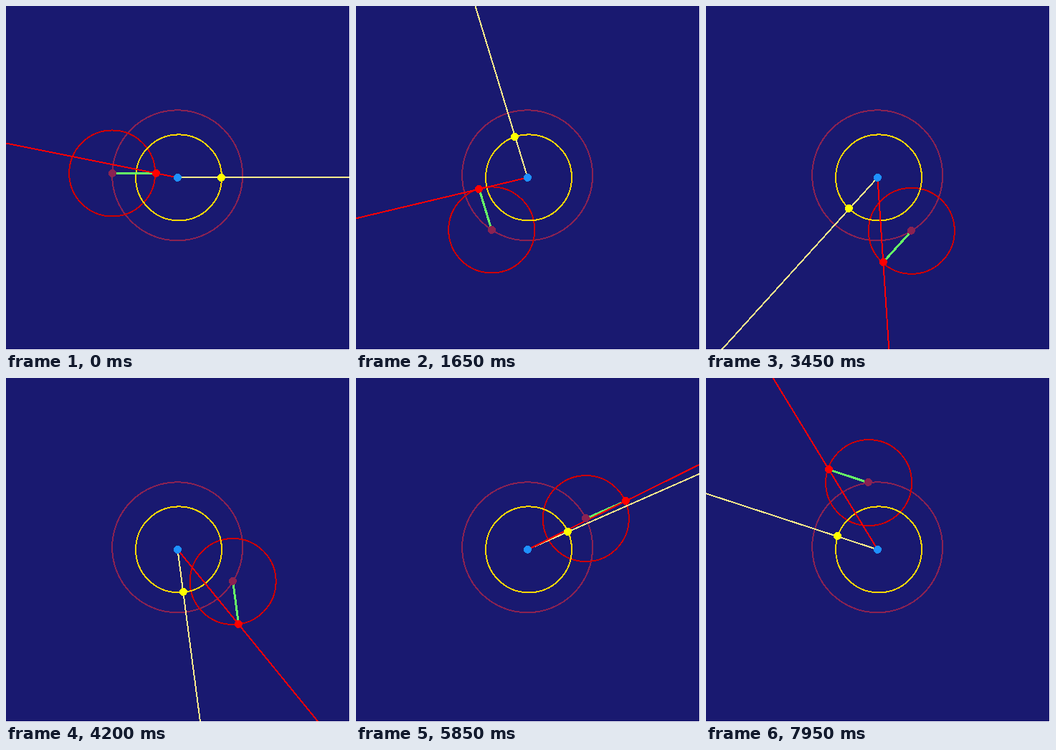
An HTML page that plays this animation: 480x480 px, repeating every 8000 ms.

```html
<!DOCTYPE html>
<html lang="en">
<head>
<meta charset="utf-8">
<title>Epicycle model</title>
<style>
  html, body { margin: 0; width: 100%; height: 100%; overflow: hidden; background: #fff; }
  svg { display: block; background: #191970; shape-rendering: crispEdges; fill: none; stroke-width: 2; }
</style>
</head>
<body>
<svg width="479" height="479" viewBox="0 0 479 479">
  <g transform="translate(-.35 -.2)">
    <circle id="deferent" stroke="#8b2252"/>
    <circle id="epicycle" stroke="#cd0000"/>
    <circle id="sunOrbit" stroke="#ffd700"/>
    <line id="arm" stroke="#66ff66" stroke-width="3"/>
    <line id="sunRay" stroke="#ffec8b"/>
    <line id="planetRay" stroke="#ff0000"/>
  </g>
  <circle id="hubDot" r="5.4" fill="#8b2252"/>
  <circle id="planetDot" r="5.4" fill="#ff0000"/>
  <circle id="sunDot" r="5.4" fill="#ffff00"/>
  <circle id="earthDot" r="5.4" fill="#1e90ff"/>
</svg>
<script>
const LOOP = 8000, STEP = 150;
const RAD = Math.PI / 180;

const earth = { x: 239.8, y: 239.6 };
const sunOrbit = { x: 241.4, y: 239.6, r: 60 };
const deferent = { x: 239.5, y: 236.5, r: 91 };
const equant = { x: 239.5, y: 233.5 };
const SUN_RATE = 9.8563, PLANET_RATE = 5.2407; // degrees per step
const PLANET_START = 180.1;

function set(id, attrs) {
  const el = document.getElementById(id);
  for (const key in attrs) el.setAttribute(key, attrs[key]);
}

function ring(id, c, r) {
  set(id, { cx: c.x, cy: c.y, r });
}

// Dots sit on whole pixels
function dot(id, p) {
  set(id, { cx: Math.round(p.x) - 0.5, cy: Math.round(p.y) - 0.5 });
}

function line(id, a, b) {
  set(id, { x1: a.x, y1: a.y, x2: b.x, y2: b.y });
}

// Sight line from the earth through p, past the edge of the stage
function ray(id, p) {
  const dx = p.x - earth.x, dy = p.y - earth.y;
  const k = 500 / Math.hypot(dx, dy);
  line(id, earth, { x: earth.x + dx * k, y: earth.y + dy * k });
}

function sunAt(n) {
  const a = n * SUN_RATE * RAD;
  return {
    x: sunOrbit.x + sunOrbit.r * Math.cos(a),
    y: sunOrbit.y - sunOrbit.r * Math.sin(a)
  };
}

// Point on the deferent that turns evenly as seen from the equant
function hubAt(n) {
  const a = (PLANET_START + n * PLANET_RATE) * RAD;
  const ux = Math.cos(a), uy = -Math.sin(a);
  const ox = equant.x - deferent.x, oy = equant.y - deferent.y;
  const b = ox * ux + oy * uy;
  const t = -b + Math.sqrt(b * b + deferent.r ** 2 - ox * ox - oy * oy);
  return { x: equant.x + t * ux, y: equant.y + t * uy };
}

function draw(n) {
  const sun = sunAt(n), hub = hubAt(n);
  const planet = { x: hub.x + sun.x - earth.x, y: hub.y + sun.y - earth.y };

  ring('epicycle', hub, 60);
  line('arm', hub, planet);
  ray('sunRay', sun);
  ray('planetRay', planet);
  dot('hubDot', hub);
  dot('planetDot', planet);
  dot('sunDot', sun);
}

ring('deferent', deferent, deferent.r);
ring('sunOrbit', sunOrbit, sunOrbit.r);
dot('earthDot', earth);

const start = performance.now();
function tick() {
  const t = (performance.now() - start) % LOOP;
  draw(Math.floor(t / STEP));
  requestAnimationFrame(tick);
}
tick();
</script>
</body>
</html>
```
